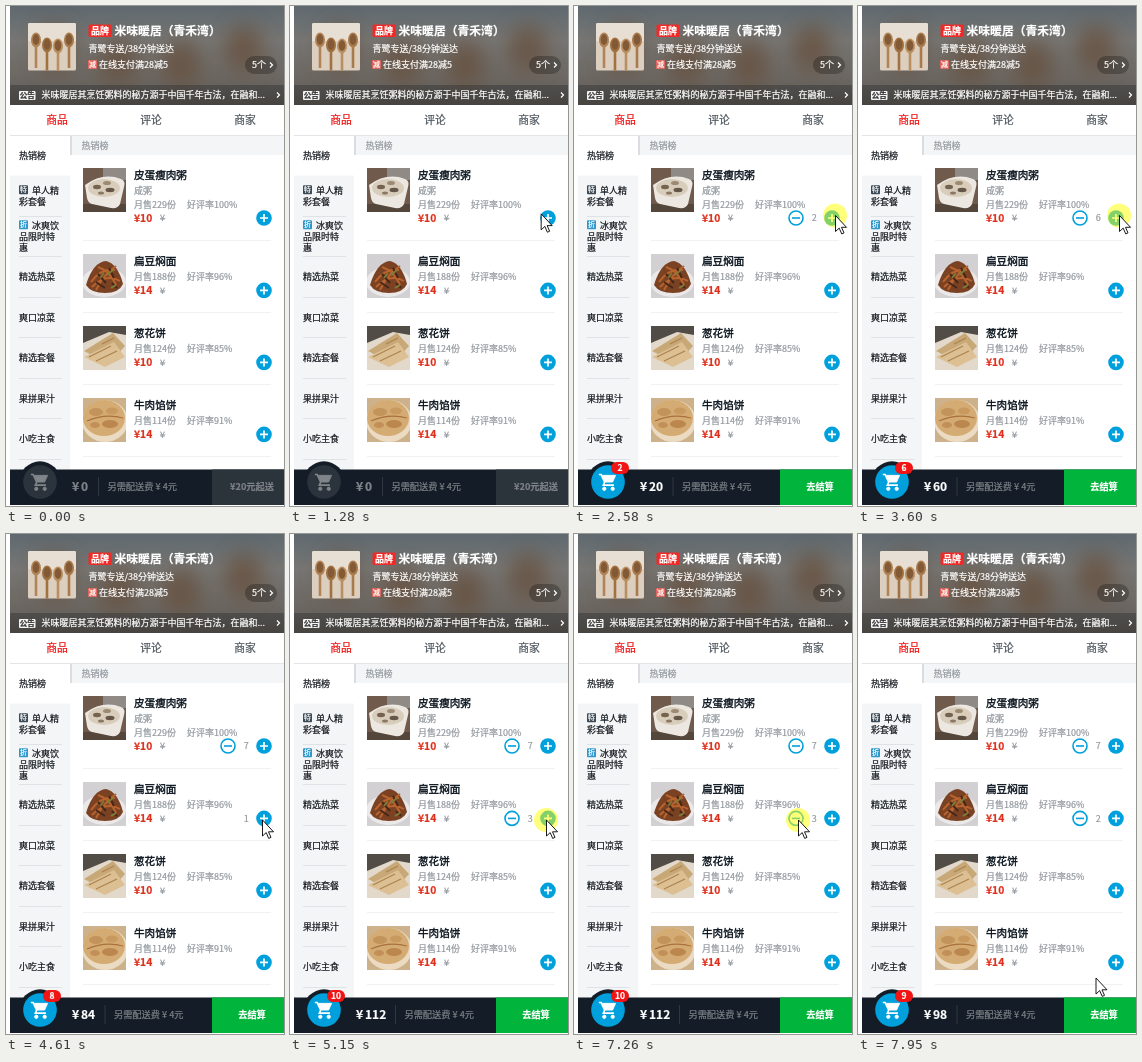
These frames come from a looping animation (278x500 px, 8 s). An HTML page:

```html
<!DOCTYPE html>
<html lang="zh">
<head>
<meta charset="utf-8">
<title>点餐</title>
<style>
html, body { margin: 0; width: 100%; height: 100%; overflow: hidden; background: #fff; }
svg { display: block; width: 100vw; height: 100vh; }
text { font-family: "Noto Sans CJK SC", "Noto Sans CJK", "Noto Sans", sans-serif; white-space: pre; stroke-width: .22; }
</style>
</head>
<body>
<svg id="stage" viewBox="0 0 278 500" xmlns="http://www.w3.org/2000/svg"></svg>
<script>
const LOOP = 8000, BLUE = '#00a0dc', GREY = '#93999f', INK = '#07111b', RED = '#f01414';
const DIM = '#7d8287';

// ---- markup helpers (text is placed by its vertical centre) ----
const text = (x, cy, size, str, fill, more = '') =>
  `<text x="${x}" y="${cy + size * 0.37}" font-size="${size}" fill="${fill}" stroke="${fill}" ${more}>${str}</text>`;
const rect = (x, y, w, h, fill, more = '') =>
  `<rect x="${x}" y="${y}" width="${w}" height="${h}" fill="${fill}" ${more}/>`;
const oval = (x, y, rx, ry, fill, more = '') =>
  `<ellipse cx="${x}" cy="${y}" rx="${rx}" ry="${ry}" fill="${fill}" ${more}/>`;
const line = (d, stroke, w, more = '') =>
  `<path d="${d}" fill="none" stroke="${stroke}" stroke-width="${w}" ${more}/>`;
const BOLD = 'font-weight="700"', MID = 'text-anchor="middle"';

// ---- header ----
// spoons inside the 48 px shop picture; the backdrop is the same picture, enlarged and blurred
const SPOONS = [[8, 17, '#b08456'], [19, 22, '#a1713f'], [30, 23, '#b98f60'], [41, 17, '#a97b4c']];
const spoon = ([x, y, c]) =>
  rect(22 + x - 1.3, 17 + y, 2.6, 28, c) + oval(22 + x, 17 + y, 5, 7.5, c) + oval(22 + x, 16.5 + y, 3.3, 5.4, '#835a36');
const blob = ([x, y]) => oval(4 + x * 5.7, y * 2.5, 20, 24, '#66503c');

function header() {
  return '<g clip-path="url(#head)">' + rect(4, 0, 274, 99, 'url(#sky)') +
    `<g filter="url(#soft)" opacity=".75">${SPOONS.map(blob).join('')}</g>` +
    rect(4, 79, 274, 20, INK, 'opacity=".25"') + '</g>' +
    '<g clip-path="url(#logo)">' + rect(22, 17, 48, 48, '#dccfc0') + rect(22, 17, 48, 18, '#e8dfd4') +
    SPOONS.map(spoon).join('') + '</g>' +
    rect(82.5, 18.5, 23, 12.5, '#ee2b28', 'rx="1.5"') +
    text(94, 24.7, 9, '品牌', '#fff', BOLD + ' ' + MID) +
    text(108.5, 24.7, 11.8, '米味暖居（青禾湾）', '#fff', BOLD) +
    text(82.5, 43, 9, '青鹭专送/38分钟送达', '#fff') +
    rect(82, 54, 9, 9, '#e0665e', 'rx="1"') + text(86.5, 58.5, 7, '减', '#fff', MID) +
    text(93, 59, 9, '在线支付满28减5', '#fff') +
    rect(239, 50, 32, 18, '#000', 'rx="9" opacity=".25"') +
    text(246, 59, 9, '5个', '#fff') + line('M264 56.5l2.5 2.5-2.5 2.5', '#fff', 1.2) +
    rect(13, 85, 16.5, 9, '#f4f4f4', 'rx="1"') + text(21.2, 89.4, 7.5, '公告', '#333', BOLD + ' ' + MID) +
    text(35.5, 89, 9, '米味暖居其烹饪粥料的秘方源于中国千年古法，在融和...', '#fff') +
    line('M271 86.5l2.5 2.5-2.5 2.5', '#fff', 1.2);
}

// ---- tabs and side menu ----
function tabs() {
  return ['商品', '评论', '商家'].map((s, i) =>
    text(51 + 94 * i, 114, 10.8, s, i ? '#4d555d' : RED, MID)).join('') +
    rect(4, 129, 274, 1, '#e3e5e7');
}
const MENU = [['热销榜'], ['单人精', '彩套餐'], ['冰爽饮', '品限时特', '惠'], ['精选热菜'],
  ['爽口凉菜'], ['精选套餐'], ['果拼果汁'], ['小吃主食']];
const TAGS = { 1: ['特', '#3c4a56'], 2: ['折', '#2f97cc'] };
function menu() {
  let out = rect(4, 130, 60, 334, '#f3f5f7') + rect(4, 130, 60, 39.5, '#fff');
  MENU.forEach((rows, i) => {
    const mid = 149.3 + 40.5 * i, tag = TAGS[i];
    if (i) out += rect(13, Math.round(mid + 20), 43, 1, '#e0e3e6');
    rows.forEach((s, k) => {
      const y = mid + 11 * (k - (rows.length - 1) / 2);
      const lead = tag && !k;
      if (lead) out += rect(13, y - 5, 9, 9, tag[1], 'rx="1"') + text(17.5, y - 0.5, 7, tag[0], '#fff', MID);
      out += text(lead ? 26 : 13, y, 9, s, '#14191e');
    });
  });
  return out;
}

// ---- food list ----
const PICS = [
  rect(0, 0, 43, 44, '#6f5a4b') + rect(20, 0, 23, 12, '#8f8a86') + rect(0, 36, 43, 8, '#55463b') +
    '<path d="M2 17Q20 4 38 11q5 2 3 8l-4 17q-2 5-9 4L9 36q-4-1-5-6z" fill="#ece8e1"/>' +
    oval(21, 20, 16, 9, '#d8cdbb') + oval(14, 19, 4, 2.2, '#75624f') + oval(24, 15, 4, 2, '#9d8a75') +
    oval(27, 22, 4.5, 2.2, '#66564a') + oval(18, 25, 3, 1.6, '#8c7763'),
  rect(0, 0, 43, 44, '#d3d0d3') + oval(21, 28, 22, 15, '#eae8e8') +
    '<path d="M3 31Q10 8 23 7q12 3 17 23-4 9-18 9T3 31z" fill="#7a4222"/>' +
    line('M8 28q10-14 24-12M9 33q14-14 28-6M15 13q12 4 18 18M13 36q8-16 20-24', '#b9642f', 2) +
    line('M15 20l8 9M26 14l5 10M13 28l9 6M29 29l5 5', '#45281a', 2) + line('M24 21l6-5M17 24l4-5M28 34l5-3', '#7f7d3a', 1.8),
  rect(0, 0, 43, 44, '#e2d9cb') + '<path d="M0 0h43v9L26 6 0 17z" fill="#514c46"/>' +
    '<path d="M1 25L30 7l12 13-16 18z" fill="#c9a878"/><path d="M1 31l30-15 11 15-20 10z" fill="#dcc093"/>' +
    line('M6 31l22-11M13 35l21-10M19 18l12-6', '#ab8351', 1.3),
  rect(0, 0, 43, 44, '#cdb18a') + oval(22, 23, 23, 21, '#eadbc2') + oval(21, 20, 21, 18, '#d5ab74') +
    oval(13, 14, 7, 4, '#c2935a') + oval(29, 13, 6, 3.5, '#c99a60') + oval(27, 26, 8, 4, '#bb874e') +
    oval(12, 27, 5, 3, '#c18f57') + line('M4 23q18-8 36-3', '#a9713b', 1.2)
];
const FOODS = [
  { name: '皮蛋瘦肉粥', top: 162, y: 212, sold: 229, rate: 100, price: 10, desc: '咸粥' },
  { name: '扁豆焖面', top: 248, y: 284.4, sold: 188, rate: 96, price: 14 },
  { name: '葱花饼', top: 320, y: 356.4, sold: 124, rate: 85, price: 10 },
  { name: '牛肉馅饼', top: 392, y: 428.4, sold: 114, rate: 91, price: 14 }
];
function food(f, i) {
  const y = f.y;
  return `<svg x="77" y="${f.top}" width="43" height="44">${PICS[i]}</svg>` +
    text(128, f.top + 7, 10.6, f.name, INK, 'font-weight="500" style="stroke-width:.35"') +
    (f.desc ? text(128, y - 27, 9, f.desc, GREY) : '') +
    text(128, y - 13.4, 9, `月售${f.sold}份`, GREY) +
    text(181, y - 13.4, 9, `好评率${f.rate}%`, GREY) +
    text(128, y, 10.3, '¥' + f.price, '#e0301c', BOLD) +
    text(154, y, 9, '¥', GREY) + line(`M154 ${y + 0.3}h5.5`, GREY, 0.7) +
    rect(77, Math.round(y) + 22, 188, 1, '#f0f1f2') +
    `<g id="minus${i}" visibility="hidden"><circle r="7" fill="none" stroke="${BLUE}" stroke-width="1.6"/>` +
    line('M-4 0h8', BLUE, 1.6) + '</g>' +
    text(240.3, y, 9, '', GREY, `id="count${i}" ` + MID) +
    `<circle cx="258" cy="${y}" r="7.8" fill="${BLUE}"/>` +
    line(`M254 ${y}h8M258 ${y - 4}v8`, '#fff', 1.7);
}
function list() {
  return rect(64, 130, 214, 19, '#f3f5f7') + rect(64, 130, 2, 19, '#d9dde1') +
    text(75.5, 139.5, 9, '热销榜', GREY) + FOODS.map(food).join('');
}

// ---- cart bar ----
function bar() {
  return rect(4, 463.5, 274, 35.5, '#141d27') + '<circle cx="34" cy="476" r="20.7" fill="#141d27"/>' +
    '<circle id="disc" cx="34" cy="476" r="16.8"/>' +
    '<g id="trolley" transform="translate(24 466) scale(.84)">' +
    '<path d="M5.2 4H21l-3.6 8H8.6z"/><circle cx="7.5" cy="20" r="2"/><circle cx="17.5" cy="20" r="2"/>' +
    '<path d="M1 3h2.8l4.2 9-1.6 3.6h12.6" fill="none" stroke-width="2"/></g>' +
    '<g id="badge">' + rect(37, 456, 18, 12, RED, 'rx="6"') +
    text(46, 462, 8.5, '', '#fff', `id="total" ${BOLD} ${MID}`) + '</g>' +
    '<g id="sum">' + text(66, 480.5, 12, '¥', 'inherit', BOLD) +
    text(75, 480.5, 12, '', 'inherit', 'id="money" ' + BOLD) + '</g>' +
    '<g id="fee">' + rect(0, 471, 1, 19, '#2f3740') + text(9.5, 481, 9.2, '另需配送费 ¥ 4元', DIM) + '</g>' +
    rect(206, 463.5, 72, 35.5, '#2b333b', 'id="pay"') +
    text(246, 481, 9.2, '', '#fff', `id="label" ${BOLD} ${MID}`);
}

document.getElementById('stage').innerHTML =
  `<defs><linearGradient id="sky" x2="0" y2="1"><stop stop-color="#5f696f"/><stop offset=".35" stop-color="#777674"/>
  <stop offset=".75" stop-color="#6b6661"/><stop offset="1" stop-color="#5d554e"/></linearGradient>
  <filter id="soft" x="-50%" y="-50%" width="200%" height="200%"><feGaussianBlur stdDeviation="10"/></filter>
  <clipPath id="head"><rect x="4" width="274" height="99.3"/></clipPath>
  <clipPath id="logo"><rect x="22" y="17" width="48" height="47.5" rx="1.5"/></clipPath></defs>` +
  rect(0, 0, 278, 500, '#fff') + header() + tabs() + list() + menu() + bar() +
  '<circle id="glow" r="12" fill="#ff0" opacity=".52"/>' +
  '<path id="arrow" d="M0 0V16l3.7-3.4 2.5 5.8 2.3-1-2.5-5.6H11z" fill="#fff" stroke="#000" stroke-width=".9"/>';

// ---- timeline ----
// press, release, moment the count changes, item, change
const TAPS = [
  [1740, 1890, 1890, 0, 1], [2430, 2510, 2510, 0, 1], [2580, 2660, 2660, 0, 1],
  [2830, 2980, 2980, 0, 1], [3360, 3450, 3450, 0, 1], [3600, 3680, 3600, 0, 1],
  [3760, 3840, 3840, 0, 1], [4460, 4610, 4610, 1, 1], [4770, 4850, 4850, 1, 1],
  [4930, 5000, 5000, 1, 1], [5080, 5160, 5160, 1, 1], [6260, 6330, 6330, 1, 1],
  [6780, 6860, 6860, 1, -1], [7010, 7090, 7090, 1, -1], [7260, 7330, 7330, 1, -1]
];
// first step, last step, number of steps, end x, end y
const MOVES = [
  [970, 970, 1, 251, 204], [1050, 1050, 1, 246, 207], [1200, 1580, 6, 261.5, 209.5],
  [3920, 4070, 3, 266, 224], [4150, 4380, 4, 256.5, 286], [5300, 5540, 4, 227, 284.5],
  [5710, 5940, 4, 247, 284.5], [6030, 6090, 2, 261, 282], [6410, 6630, 4, 224, 282.5],
  [7170, 7170, 1, 224.5, 286], [7410, 7790, 6, 231, 359], [7870, 7950, 2, 238, 444]
];
// start of the minus button's roll, and how far it has already run
const ROLL = [[1890, 40], [4610, 0]];

function pointer(t) {
  let x = 251, y = 204;
  for (const [a, b, n, ex, ey] of MOVES) {
    if (t < a) break;
    const step = n > 1 ? Math.floor((t - a) / (b - a) * (n - 1)) + 1 : n;
    const p = Math.min(1, step / n);
    x += (ex - x) * p;
    y += (ey - y) * p;
  }
  return [x, y];
}

function rolled(t, [from, lead]) {
  const run = Math.floor((t - from) / 78) * 78 + lead;
  return Math.max(0, Math.min(1, run / 390));
}

const $ = id => document.getElementById(id);
const set = (id, attrs) => { for (const k in attrs) $(id).setAttribute(k, attrs[k]); };
const show = on => ({ visibility: on ? 'visible' : 'hidden' });
const tint = c => ({ fill: c, stroke: c });

function draw(t) {
  const counts = [0, 0];
  for (const [, , at, item, d] of TAPS) if (t >= at) counts[item] += d;
  const total = counts[0] + counts[1];
  const sum = counts[0] * FOODS[0].price + counts[1] * FOODS[1].price;

  counts.forEach((n, i) => {
    $('count' + i).textContent = n || '';
    const p = rolled(t, ROLL[i]);
    set('minus' + i, {
      ...show(n > 0), opacity: p,
      transform: `translate(${240 - 18 * p} ${FOODS[i].y}) rotate(${180 * (1 - p)})`
    });
  });

  const on = total > 0, ready = sum >= 20;
  set('disc', { fill: on ? BLUE : '#2b343c' });
  set('trolley', tint(on ? '#fff' : '#80858a'));
  set('badge', show(on));
  $('total').textContent = total;
  set('sum', tint(on ? '#fff' : '#80858a'));
  $('money').textContent = sum;
  set('fee', { transform: `translate(${85.5 + 6.5 * String(sum).length} 0)` });
  set('pay', { fill: ready ? '#00b43c' : '#2b333b' });
  set('label', tint(ready ? '#fff' : DIM));
  $('label').textContent = ready ? '去结算' : on ? `还差¥${20 - sum}元起送` : '¥20元起送';

  const [x, y] = pointer(t);
  set('arrow', { ...show(t >= 970), transform: `translate(${x} ${y})` });
  set('glow', { ...show(TAPS.some(([a, b]) => t >= a && t < b)), cx: x - 0.5, cy: y });
}

const start = performance.now();
function tick() {
  draw((performance.now() - start) % LOOP);
  requestAnimationFrame(tick);
}
tick();
</script>
</body>
</html>
```
